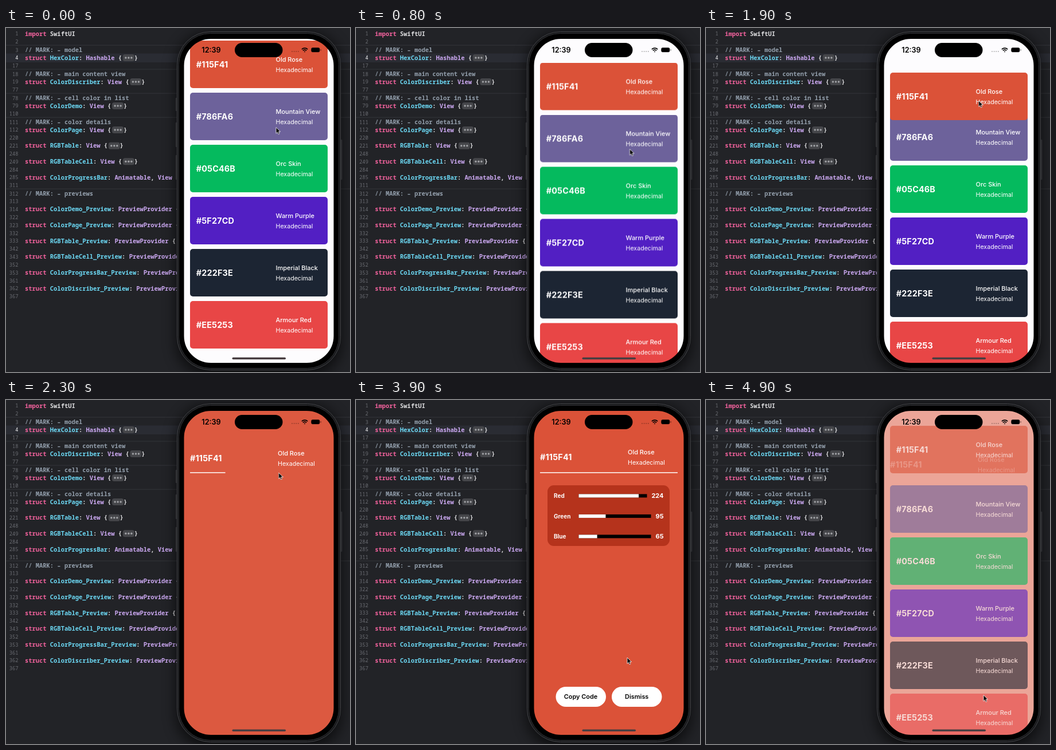
Animation of 600x601 px, one loop 5000 ms. Source, as an HTML page:

```html
<!DOCTYPE html>
<html lang="en">
<head>
<meta charset="utf-8">
<title>Color list</title>
<style>
html, body { margin: 0; width: 100%; height: 100%; overflow: hidden; background: #222327; }
svg { display: block; }
text { white-space: pre; }
.code { font: 600 10.45px "Noto Sans Mono", "DejaVu Sans Mono", monospace; fill: #dedee0; }
.num { font: 400 8.7px "Noto Sans Mono", "DejaVu Sans Mono", monospace; fill: #6b6d73; text-anchor: end; }
.num.on { fill: #f2f2f4; }
.kw { fill: #f2629d; font-weight: 700; }
.decl { fill: #6cd8f4; }
.type { fill: #cba8f1; }
.slash { fill: #808a95; }
.mark { fill: #939fac; font-weight: 700; }
.ui { font-family: Inter, Roboto, sans-serif; fill: #fff; }
.hex { font-size: 14.3px; font-weight: 700; letter-spacing: .2px; }
.name { font-size: 10.95px; font-weight: 500; }
.sub { font-size: 10.65px; }
.label { font-size: 10px; font-weight: 700; }
.value { font-size: 11px; font-weight: 700; text-anchor: end; }
.btn { font-size: 10.9px; font-weight: 600; fill: #000; text-anchor: middle; }
.clock { font-size: 12.6px; font-weight: 600; fill: #000; text-anchor: middle; }

.list, .fade, .first, .sheet, .head, .rule, .panel, .bar, .cursor {
  animation: 5s linear infinite;
}
.rule, .bar { transform-box: fill-box; transform-origin: left center; animation-timing-function: ease-out; }
.list { animation-name: scroll; }
.fade { animation-name: listFade; }
.first { animation-name: lift; }
.sheet { animation-name: sheet; }
.head { animation-name: head; }
.rule { animation-name: rule; }
.panel { animation-name: panel; }
.cursor { animation-name: cursor; animation-timing-function: ease-in-out; }
.bar0 { animation-name: bar0; }
.bar1 { animation-name: bar1; animation-timing-function: ease-in-out; }
.bar2 { animation-name: bar2; animation-timing-function: ease-in-out; }

@keyframes scroll {
  0% { transform: translateY(22px); animation-timing-function: ease-in-out; }
  15%, 18% { transform: translateY(60.5px); animation-timing-function: ease-out; }
  25%, 100% { transform: translateY(58px); }
}
@keyframes listFade {
  0%, 38% { opacity: 1; }
  46%, 94.4% { opacity: 0; }
  98% { opacity: .6; }
  100% { opacity: .85; }
}
@keyframes lift {
  0%, 36.4% { transform: translateY(0); }
  38% { transform: translateY(20px); }
  46% { transform: translateY(0); }
  94.4% { transform: translateY(-26px); }
  98% { transform: translateY(-13px); }
  100% { transform: translateY(-6px); }
}
@keyframes sheet {
  0%, 38% { opacity: 0; }
  46% { opacity: .96; }
  47.5%, 94.4% { opacity: 1; }
  98% { opacity: .52; }
  100% { opacity: .25; }
}
@keyframes head {
  0%, 38% { transform: translateY(20px); animation-timing-function: ease-out; }
  46% { transform: translateY(2px); }
  49%, 94.4% { transform: translateY(0); }
  98% { transform: translateY(13px); }
  100% { transform: translateY(20px); }
}
@keyframes rule {
  0%, 44% { transform: scaleX(0); animation-timing-function: ease-in; }
  46% { transform: scaleX(.25); }
  50%, 90% { transform: scaleX(1); }
  94%, 100% { transform: scaleX(0); }
}
@keyframes panel {
  0%, 46.5% { opacity: 0; }
  51%, 90% { opacity: 1; }
  94%, 100% { opacity: 0; }
}
@keyframes bar0 { 0%, 48% { transform: scaleX(0); } 53.6%, 100% { transform: scaleX(1); } }
@keyframes bar1 { 0%, 52.6% { transform: scaleX(0); } 56%, 100% { transform: scaleX(1); } }
@keyframes bar2 { 0%, 55% { transform: scaleX(0); } 60%, 100% { transform: scaleX(1); } }
@keyframes cursor {
  0% { transform: translate(471px, 173.5px); }
  15%, 19% { transform: translate(477.5px, 211.5px); }
  33%, 69% { transform: translate(475.5px, 127px); }
  78% { transform: translate(473px, 450px); }
  85%, 100% { transform: translate(484px, 515.5px); }
}
</style>
</head>
<body>
<svg width="600" height="601" viewBox="0 0 600 601">
  <defs>
    <filter id="blur" x="-30%" y="-30%" width="160%" height="160%"><feGaussianBlur stdDeviation="12"/></filter>
    <clipPath id="screen"><rect x="306.5" y="15" width="269" height="574" rx="51"/></clipPath>
  </defs>
  <rect width="600" height="601" fill="#222327"/>
  <g id="editor"></g>
  <rect x="297" y="8" width="288" height="600" rx="58" opacity=".62" filter="url(#blur)"/>

  <g fill="#2a2b2e">
    <rect x="295.5" y="122" width="4" height="23" rx="1"/>
    <rect x="295.5" y="165" width="4" height="43" rx="1"/>
    <rect x="295.5" y="222" width="4" height="43" rx="1"/>
    <rect x="582.5" y="195" width="4" height="70" rx="1"/>
  </g>
  <rect x="298.5" y="6.5" width="285" height="591" rx="58" fill="#17181a" stroke="#434448"/>
  <rect x="301.5" y="9.5" width="279" height="585" rx="55" fill="#000" stroke="#303135"/>

  <g class="ui" clip-path="url(#screen)">
    <rect x="306" y="15" width="270" height="574" fill="#fdfcfe"/>

    <g class="sheet">
      <rect x="306" y="15" width="270" height="574" fill="#db5238"/>
      <g class="head">
        <text class="hex" x="321" y="105.4">#115F41</text>
        <text class="name" x="474" y="95.2">Old Rose</text>
        <text class="sub" x="474" y="113">Hexadecimal</text>
      </g>
      <rect class="rule" x="321" y="126.2" width="240" height="1.5" fill="#fff"/>
      <g class="panel">
        <rect x="334" y="149" width="213" height="106" rx="11" fill="#b5331c"/>
        <g id="channels"></g>
        <rect x="348.5" y="501" width="87.5" height="35" rx="17.5"/>
        <rect x="446" y="501" width="87.5" height="35" rx="17.5"/>
        <text class="btn" x="392" y="522.4">Copy Code</text>
        <text class="btn" x="489.7" y="522.4">Dismiss</text>
      </g>
    </g>

    <g class="fade"><g class="list" id="cards"></g></g>

    <text class="clock" x="358" y="42.8">12:39</text>
    <rect x="399" y="26" width="83.5" height="25" rx="12.5" fill="#000"/>
    <g fill="#000" fill-opacity=".3">
      <circle cx="499" cy="41" r="1"/><circle cx="502.6" cy="41" r="1"/>
      <circle cx="506.2" cy="41" r="1"/><circle cx="509.8" cy="41" r="1"/>
    </g>
    <g fill="none" stroke="#000" stroke-width="1.6">
      <path d="M515.8 37.3a7.4 7.4 0 0 1 10.4 0M517.8 39.5a4.5 4.5 0 0 1 6.4 0"/>
      <path d="M521 42.6l-1.4-1.5a2 2 0 0 1 2.8 0z" fill="#000" stroke="none"/>
    </g>
    <rect x="532.5" y="34.6" width="14.6" height="7.4" rx="2.2" fill="#000" stroke="#000" stroke-opacity=".4"/>
    <rect x="548.5" y="37" width="1.2" height="2.8" rx=".6" fill="#000" fill-opacity=".45"/>
    <rect x="394.5" y="575.6" width="93.5" height="3.4" rx="1.7" fill="#483e41"/>
  </g>
  <rect x="306.5" y="15" width="269" height="574" rx="51" fill="none" stroke="#000" stroke-width="8"/>

  <path class="cursor" d="M0 0V10.6L2.4 8.4L4 12L5.9 11.1L4.3 7.6H7.6Z" fill="#000" stroke="#fff" stroke-width=".8" stroke-linejoin="round"/>
</svg>
<script>
const CH = 6.27, LEFT = 33;
const span = (cls, s) => `<tspan class="${cls}">${s}</tspan>`;
const get = id => document.getElementById(id);

// A string starting with "/" is a MARK line; an array is a struct: name, conformance, folded.
const preview = name => [name + '_Preview', 'PreviewProvider'];
const lines = [
  [1, 'import'], [2], [3, '/model'], [4, ['HexColor', 'Hashable', 1]], [17],
  [18, '/main content view'], [19, ['ColorDiscriber', 'View', 1]], [77],
  [78, '/cell color in list'], [79, ['ColorDemo', 'View', 1]], [110],
  [111, '/color details'], [112, ['ColorPage', 'View', 1]], [220],
  [221, ['RGBTable', 'View', 1]], [248], [249, ['RGBTableCell', 'View', 1]], [284],
  [285, ['ColorProgressBar', 'Animatable, View']], [311], [312, '/previews'], [313],
  [314, preview('ColorDemo')], [322], [323, preview('ColorPage')], [332],
  [333, preview('RGBTable')], [342], [343, preview('RGBTableCell')], [352],
  [353, preview('ColorProgressBar')], [361], [362, preview('ColorDiscriber')], [367]
];

function fold(chars, y) {
  const x = LEFT + chars * CH + 1.6;
  const dots = [5, 10, 15].map(d => `<circle cx="${x + d}" cy="${y}" r="1.7" fill="#a0a1a5"/>`).join('');
  return `<rect x="${x}" y="${y - 6}" width="20" height="12" rx="3.5" fill="#45464a"/>${dots}` +
    `<text class="code" x="${x + 19.8}" y="${y + 3.7}">}</text>`;
}

let marks = 0;
get('editor').innerHTML = lines.map(([num, body], i) => {
  const isMark = body && body[0] === '/';
  if (isMark) marks++;
  const y = 10 + 13.82 * i + 0.55 * marks;
  let out = '', code = '';
  if (num === 4) out += `<rect y="${y - 7.5}" width="600" height="15.5" fill="#2a2c33"/>`;
  if (isMark) {
    out += `<rect y="${y - 8.6}" width="600" height="1" fill="#34353a"/>`;
    code = span('slash', '// ') + span('mark', 'MARK: – ' + body.slice(1));
  } else if (body === 'import') {
    code = span('kw', 'import') + ' SwiftUI';
  } else if (body) {
    const [name, kind, folded] = body;
    const types = kind.split(', ').map(t => span('type', t)).join(', ');
    code = span('kw', 'struct') + ' ' + span('decl', name) + ': ' + types + ' {';
    if (folded) out += fold(`struct ${name}: ${kind} {`.length, y);
  }
  return out + `<text class="num${num === 4 ? ' on' : ''}" x="21.5" y="${y + 3.4}">${num}</text>` +
    `<text class="code" x="${LEFT}" y="${y + 3.7}">${code}</text>`;
}).join('');

const cards = [
  ['#115F41', 'Old Rose', '#db5238'],
  ['#786FA6', 'Mountain View', '#6d629b'],
  ['#05C46B', 'Orc Skin', '#05ba5e'],
  ['#5F27CD', 'Warm Purple', '#521fc3'],
  ['#222F3E', 'Imperial Black', '#1c2533'],
  ['#EE5253', 'Armour Red', '#e84646']
];
// The first card is painted last so it stays on top when lifted.
get('cards').innerHTML = cards.map(([hex, name, color], i) =>
  `<g transform="translate(321 ${i * 91})"><g${i ? '' : ' class="first"'}>
    <rect width="240" height="83" rx="5" fill="${color}"/>
    <text class="hex" x="10.8" y="47.2">${hex}</text>
    <text class="name" x="149.5" y="37.2">${name}</text>
    <text class="sub" x="149.5" y="54.8">Hexadecimal</text>
  </g></g>`).reverse().join('');

get('channels').innerHTML = [['Red', 224, 119], ['Green', 95, 126], ['Blue', 65, 126]].map(([label, v, w], i) => {
  const y = 167.4 + 35.5 * i;
  return `<text class="label" x="345" y="${y + 3.7}">${label}</text>
    <rect x="388.5" y="${y - 3}" width="${w}" height="6" fill="#000"/>
    <rect class="bar bar${i}" x="388.5" y="${y - 3}" width="${w * v / 255}" height="6"/>
    <text class="value" x="536.5" y="${y + 4}">${v}</text>`;
}).join('');
</script>
</body>
</html>
```
